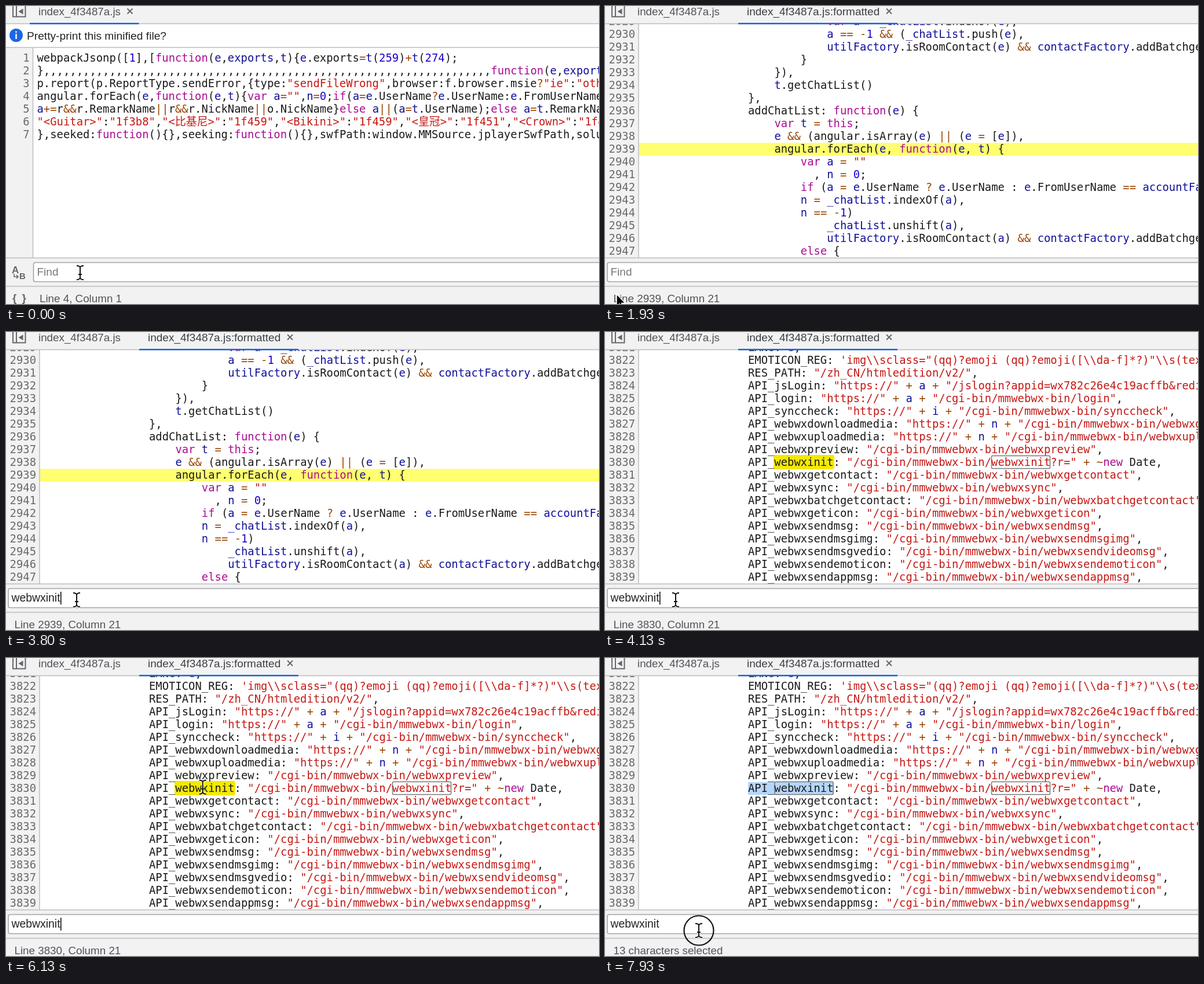
Write an HTML page that moves like this. It is 1024 px wide and 514 px high and loops after 8000 ms.

```html
<!DOCTYPE html>
<html lang="en">
<head>
<meta charset="utf-8">
<title>Searching a formatted script</title>
<style>
  html, body { margin: 0; width: 100%; height: 100%; overflow: hidden; background: #fff; }
  svg { display: block; width: 1024px; height: 514px; }
  text { font: 18.8px "Liberation Sans", Arial, sans-serif; font-variant-ligatures: none; white-space: pre; fill: #505356; }
  .code text { font: 18.87px "DejaVu Sans Mono", "Noto Sans CJK SC", "Noto Sans CJK", monospace; fill: #1b1b1b; }
  .code .num { fill: #6b6b6b; text-anchor: end; }
  .str { fill: #c41a16; }
  .key { fill: #aa0d91; }
  .lit { fill: #1c00cf; }
  .op { fill: #994500; }
  .loc { fill: #12129a; }
  .bar { fill: #f2f2f3; }
  .line { stroke: #bcbcbe; stroke-width: 1.5; }
  .blue { fill: #1a66d6; }
  .icon { fill: none; stroke: #65676a; stroke-width: 2; }
  .box { fill: none; stroke: #777; stroke-width: 1.5; }
  .bold { font-weight: bold; fill: #65676a; }
</style>
</head>
<body>
<svg viewBox="0 0 1024 514">
  <defs>
    <clipPath id="page"><rect y="31" width="1024" height="403"/></clipPath>
  </defs>

  <g id="raw" class="code">
    <rect class="bar" y="72" width="46" height="362"/>
    <path class="line" d="M46.5 72V434M0 71.5H1024"/>
  </g>
  <g clip-path="url(#page)">
    <rect id="gutter" class="bar" y="31" width="58" height="403"/>
    <path id="gutterLine" class="line" d="M58 31V434"/>
    <g id="before" class="code">
      <rect x="59" y="236" width="965" height="22" fill="#ffff70"/>
    </g>
    <g id="after" class="code">
      <rect id="hit" x="291" y="212" width="105" height="25" rx="3" fill="#f4e900"/>
      <rect id="selection" x="247" y="214" width="148" height="22" fill="#b5d6fc"/>
      <rect id="hitBox" class="box" x="293" y="213.5" width="101" height="22" rx="2"/>
      <rect class="box" x="667.5" y="213.5" width="101" height="22" rx="2"/>
    </g>
  </g>

  <rect class="bar" width="1024" height="30"/>
  <path class="line" d="M0 30.5H1024"/>
  <path class="icon" d="M12 -2V18.5H33.5V-2M18 -2V18"/>
  <path d="M29.5 4.5V14.5L21.5 9.5Z" fill="#65676a"/>
  <text x="56" y="16">index_4f3487a.js</text>
  <g id="rawTab">
    <rect class="blue" x="41" y="29" width="188.5" height="2.5"/>
    <path class="icon" d="M209.500 4.500l9 9m0-9l-9 9"/>
    <circle cx="17.500" cy="50.500" r="11.500" fill="#1a66e8"/>
    <path d="M17.500 48V57M17.500 43.500V46" stroke="#fff" stroke-width="2.400"/>
    <text x="36" y="58" style="font-size:19.2px;fill:#222">Pretty-print this minified file?</text>
  </g>
  <g id="prettyTab">
    <rect class="blue" x="230" y="29" width="275" height="2.5"/>
    <text x="245" y="16" style="font-size:19px;fill:#3c3f42">index_4f3487a.js:formatted</text>
    <path class="icon" d="M486 4.500l9 9m0-9l-9 9"/>
  </g>

  <rect class="bar" y="434" width="1024" height="80"/>
  <path class="line" d="M0 434.5H1024M0 483.5H1024"/>
  <rect id="field" y="442.5" width="1040" height="33" rx="3" fill="#fff" stroke="#a3a3a5" stroke-width="1.6"/>
  <text id="query" y="465"></text>
  <rect id="caret" y="448" width="1.5" height="22"/>
  <text id="status" y="511"></text>
  <g id="rawIcons">
    <text class="bold" x="10" y="461" style="font-size:17px">A</text>
    <text class="bold" x="23" y="471" style="font-size:15px">B</text>
    <path class="icon" style="stroke-width:1.600" d="M14 462V467H20M18 464l3 3l-3 3"/>
    <text class="bold" x="11" y="510" style="font-size:19px;letter-spacing:9px">{}</text>
  </g>

  <g id="tip">
    <rect x="0.5" y="441.5" width="119.5" height="38" fill="#ededed" stroke="#c4c4c4"/>
    <text x="14" y="467" style="font-size:19.2px;fill:#333">Pretty print</text>
  </g>
  <g id="pointer">
    <path id="arrow" d="M0 0V21L5 16.500L8.500 24.500L12 23L8.500 15.500H15Z" stroke="#fff" stroke-width="1.400"/>
    <g id="beam" fill="none">
      <path id="beamPath" d="M-6 -12Q-1 -12 0 -9Q1 -12 6 -12M0 -9V9M-6 12Q-1 12 0 9Q1 12 6 12M-3 3H3" stroke="#fff" stroke-width="4"/>
      <use href="#beamPath" id="beamInk"/>
      <path d="M-6 -12Q-1 -12 0 -9Q1 -12 6 -12M0 -9V9M-6 12Q-1 12 0 9Q1 12 6 12M-3 3H3" stroke="#111" stroke-width="2"/>
    </g>
    <circle id="ring" r="25.500" fill="none" stroke="#111" stroke-width="2.200"/>
  </g>
</svg>

<script>
const LOOP = 8000, CHAR = 11.36, PITCH = 22;
const OPEN = 1900, JUMP = 4130, PLACE = 6500, SELECT = 7130, PRESS = 7865;
const WORD = "webwxinit", TYPE_FROM = 3070, TYPE_STEP = 68;
const $ = id => document.getElementById(id);

const minified = String.raw`webpackJsonp([1],[function(e,exports,t){e.exports=t(259)+t(274);
}COMMASfunction(e,exports,t){
p.report(p.ReportType.sendError,{type:"sendFileWrong",browser:f.browser.msie?"ie":"other"
angular.forEach(e,function(e,t){var a="",n=0;if(a=e.UserName?e.UserName:e.FromUserName
a+=r&&r.RemarkName||r&&r.NickName||o.NickName}else a||(a=t.UserName);else a=t.RemarkName
"<Guitar>":"1f3b8","<比基尼>":"1f459","<Bikini>":"1f459","<皇冠>":"1f451","<Crown>":"1f451"
},seeked:function(){},seeking:function(){},swfPath:window.MMSource.jplayerSwfPath,solution`
  .replace("COMMAS", ",".repeat(68));

const chatList = String.raw`
                            var a = _chatList.indexOf(e);
                            a == -1 && (_chatList.push(e),
                            utilFactory.isRoomContact(e) && contactFactory.addBatchgetContact
                        }
                    }),
                    t.getChatList()
                },
                addChatList: function(e) {
                    var t = this;
                    e && (angular.isArray(e) || (e = [e]),
                    angular.forEach(e, function(e, t) {
                        var a = ""
                          , n = 0;
                        if (a = e.UserName ? e.UserName : e.FromUserName == accountFactory
                        n = _chatList.indexOf(a),
                        n == -1)
                            _chatList.unshift(a),
                            utilFactory.isRoomContact(a) && contactFactory.addBatchgetContact
                        else {`.slice(1);

const endpoints = String.raw`
                LANG: e,
                EMOTICON_REG: 'img\\sclass="(qq)?emoji (qq)?emoji([\\da-f]*?)"\\s(text
                RES_PATH: "/zh_CN/htmledition/v2/",
                API_jsLogin: "https://" + a + "/jslogin?appid=wx782c26e4c19acffb&redirect
                API_login: "https://" + a + "/cgi-bin/mmwebwx-bin/login",
                API_synccheck: "https://" + i + "/cgi-bin/mmwebwx-bin/synccheck",
                API_webwxdownloadmedia: "https://" + n + "/cgi-bin/mmwebwx-bin/webwxgetmedia
                API_webwxuploadmedia: "https://" + n + "/cgi-bin/mmwebwx-bin/webwxuploadmedia
                API_webwxpreview: "/cgi-bin/mmwebwx-bin/webwxpreview",
                API_webwxinit: "/cgi-bin/mmwebwx-bin/webwxinit?r=" + ~new Date,
                API_webwxgetcontact: "/cgi-bin/mmwebwx-bin/webwxgetcontact",
                API_webwxsync: "/cgi-bin/mmwebwx-bin/webwxsync",
                API_webwxbatchgetcontact: "/cgi-bin/mmwebwx-bin/webwxbatchgetcontact",
                API_webwxgeticon: "/cgi-bin/mmwebwx-bin/webwxgeticon",
                API_webwxsendmsg: "/cgi-bin/mmwebwx-bin/webwxsendmsg",
                API_webwxsendmsgimg: "/cgi-bin/mmwebwx-bin/webwxsendmsgimg",
                API_webwxsendmsgvedio: "/cgi-bin/mmwebwx-bin/webwxsendvideomsg",
                API_webwxsendemoticon: "/cgi-bin/mmwebwx-bin/webwxsendemoticon",
                API_webwxsendappmsg: "/cgi-bin/mmwebwx-bin/webwxsendappmsg",`.slice(1);

const locals = new Set("e t a n i exports _chatList utilFactory contactFactory accountFactory".split(" "));
const TOKEN = /(?<str>"(?:[^"\\]|\\.)*"?|'.*)|(?<key>\b(?:function|var|this|if|else|new)\b)|(?<lit>\b\d+\b)|(?<op>[-+=&|~?]+)|(?<name>\.?[\w$]+)|[^]/g;

function add(parent, tag, attrs, content = "") {
  const el = document.createElementNS("http://www.w3.org/2000/svg", tag);
  for (const k in attrs) el.setAttribute(k, attrs[k]);
  el.textContent = content;
  return parent.appendChild(el);
}

// Writes numbered, coloured source lines into a group.
function listing(group, source, first, numX, codeX, top) {
  source.split("\n").forEach((line, i) => {
    const y = top + i * PITCH, code = line.trimStart();
    add(group, "text", { class: "num", x: numX, y }, first + i);
    const row = add(group, "text", { x: codeX + (line.length - code.length) * CHAR, y });
    for (const { 0: token, groups } of code.matchAll(TOKEN)) {
      const kind = ["str", "key", "lit", "op"].find(k => groups[k]);
      add(row, "tspan", { class: kind || (locals.has(token) ? "loc" : "") }, token);
    }
  });
}
listing($("raw"), minified, 1, 40.7, 53.5, 96);
listing($("before"), chatList, 2929, 52, 65.2, 33);
listing($("after"), endpoints, 3821, 52, 65.2, 33);
$("beamInk").remove();

// Pointer stops: time, x, y.
const stops = [
  [0, 128, 460], [70, 128, 460], [560, 20, 497], [1950, 20, 497], [2500, 66, 490],
  [2650, 66, 490], [2950, 122, 462], [4250, 122, 462], [5100, 268, 197],
  [5500, 268, 197], [6300, 349, 226], [7200, 349, 226], [7780, 162, 470], [LOOP, 162, 470]
];
function pointerAt(t) {
  const i = stops.findIndex(s => s[0] > t);
  const [t0, x0, y0] = stops[i - 1], [t1, x1, y1] = stops[i];
  const p = (t - t0) / (t1 - t0), k = p * p * (3 - 2 * p);
  return [x0 + (x1 - x0) * k, y0 + (y1 - y0) * k];
}

const show = (id, on) => { $(id).style.display = on ? "" : "none"; };

function render(t) {
  const open = t >= OPEN, jumped = t >= JUMP;
  for (const id of ["raw", "rawTab", "rawIcons"]) show(id, !open);
  for (const id of ["prettyTab", "gutter", "gutterLine"]) show(id, open);
  show("before", open && !jumped);
  show("after", jumped);
  show("hit", t < PLACE);
  show("hitBox", t >= PLACE);
  show("selection", t >= SELECT);

  const count = Math.max(0, Math.min(WORD.length, Math.floor((t - TYPE_FROM) / TYPE_STEP) + 1));
  const query = $("query"), left = open ? 4 : 47.5;
  $("field").setAttribute("x", left);
  query.setAttribute("x", open ? 9.5 : 53.5);
  query.textContent = count ? WORD.slice(0, count) : "Find";
  query.style.fill = count ? "#222" : "#747678";
  query.style.fontSize = count ? "19.4px" : "19px";

  const lastKey = jumped ? JUMP : TYPE_FROM + (WORD.length - 1) * TYPE_STEP;
  const blinkOn = t < lastKey || (t - lastKey) % 1000 < 500;
  show("caret", t >= 2970 && t < PLACE && blinkOn);
  $("caret").setAttribute("x", count ? 10 + query.getComputedTextLength() : 10);

  const status = $("status");
  status.setAttribute("x", open ? 14.5 : 58);
  status.textContent = t >= SELECT ? "13 characters selected"
    : t >= PLACE ? "Line 3830, Column 26"
    : jumped ? "Line 3830, Column 21"
    : open ? "Line 2939, Column 21" : "Line 4, Column 1";

  show("tip", !open);
  $("tip").style.opacity = Math.max(0, Math.min(1, (t - 1130) / 140));

  const [x, y] = pointerAt(t);
  const inField = x > left && y > 442 && y < 477, inCode = open && x > 58 && y < 434;
  $("pointer").setAttribute("transform", `translate(${x} ${y})`);
  show("beam", inField || inCode);
  show("arrow", !inField && !inCode);
  show("ring", t >= PRESS);
}

const start = performance.now();
function tick() {
  render((performance.now() - start) % LOOP);
  requestAnimationFrame(tick);
}
tick();
</script>
</body>
</html>
```
